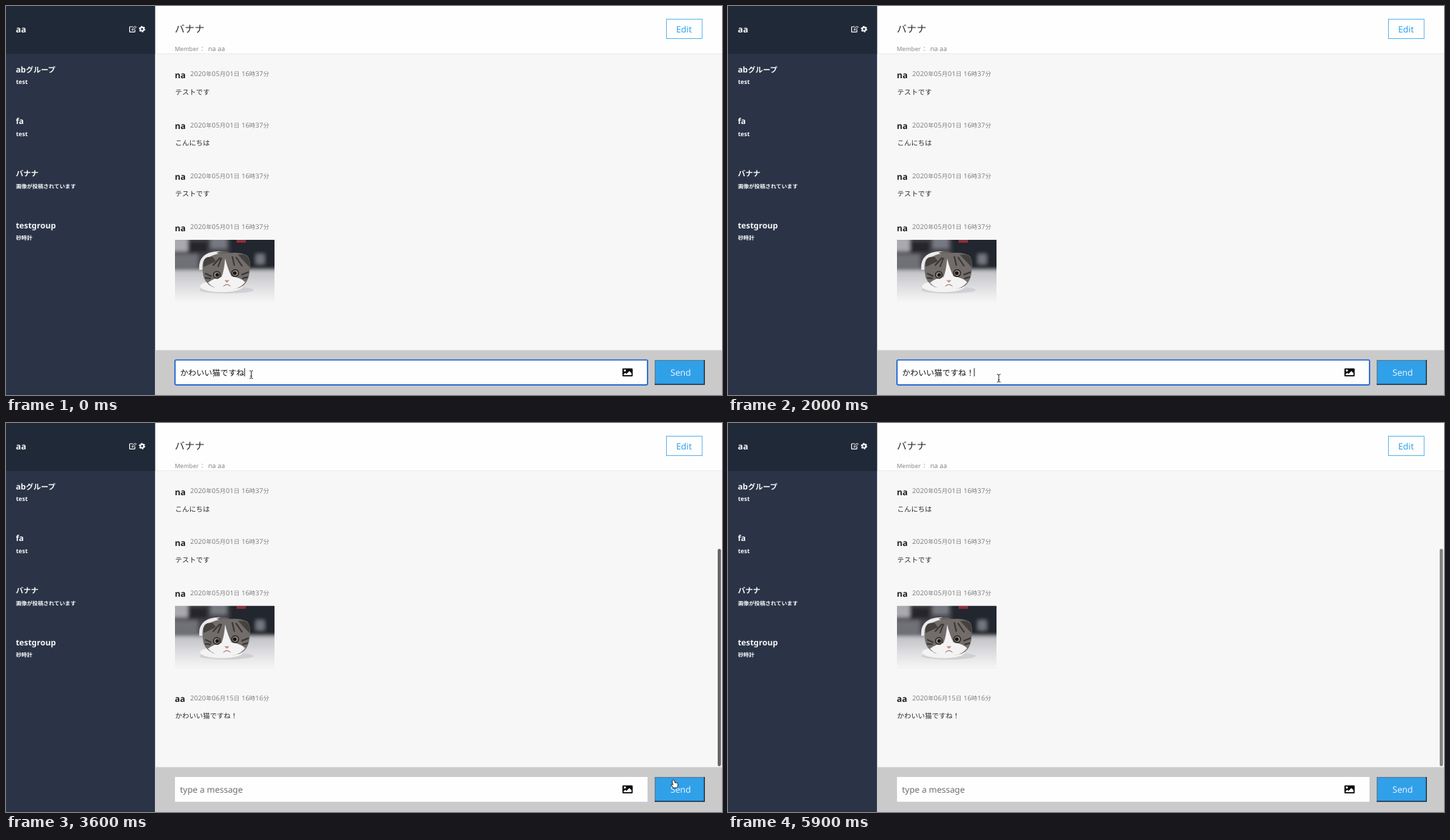
An HTML page for the animation above (6 s loop, 1000 by 544 pixels).

```html
<!DOCTYPE html>
<html lang="ja">
<head>
<meta charset="utf-8">
<title>Group chat</title>
<style>
  html, body { margin: 0; width: 100%; height: 100%; overflow: hidden; background: #f7f7f7; }
  svg { display: block; width: 100vw; height: 100vh; }
  text { white-space: pre; text-rendering: geometricPrecision; }
  .cjk { font-family: "Noto Sans CJK JP", "Noto Sans CJK", sans-serif; }
  .latin { font-family: "Noto Sans", "Open Sans", sans-serif; }
</style>
</head>
<body>
<svg id="stage" viewBox="0 0 1000 544" preserveAspectRatio="none">
  <defs>
    <clipPath id="listClip"><rect x="208" y="67" width="792" height="414"/></clipPath>
    <clipPath id="photoClip"><rect width="139" height="87"/></clipPath>
    <linearGradient id="floor" x1="0" y1="0" x2="0" y2="1">
      <stop offset="0" stop-color="#bfc0c4"/>
      <stop offset=".35" stop-color="#dadadd"/>
      <stop offset=".75" stop-color="#f5f5f5"/>
      <stop offset="1" stop-color="#fafafa"/>
    </linearGradient>
    <linearGradient id="hint" x1="0" y1="0" x2="0" y2="1">
      <stop offset="0" stop-color="#f8f8f8"/>
      <stop offset="1" stop-color="#dedede"/>
    </linearGradient>
    <filter id="soft" x="-20%" y="-20%" width="140%" height="140%"><feGaussianBlur stdDeviation="2.5"/></filter>
    <filter id="fur" x="-20%" y="-20%" width="140%" height="140%"><feGaussianBlur stdDeviation=".7"/></filter>
    <filter id="shade" x="-10%" y="-20%" width="120%" height="160%"><feGaussianBlur stdDeviation="2.5"/></filter>
  </defs>

  <rect width="1000" height="544" fill="#f7f7f7"/>

  <g clip-path="url(#listClip)">
    <g id="list">
      <g transform="translate(236 327)" clip-path="url(#photoClip)">
        <rect width="139" height="87" fill="#d2d2d6"/>
        <g filter="url(#soft)">
          <rect x="-8" y="-8" width="156" height="50" fill="#44454c"/>
          <rect x="-8" y="-8" width="26" height="24" fill="#a9a9af"/>
          <rect x="-8" y="20" width="40" height="20" fill="#6f7077"/>
          <rect x="18" y="2" width="28" height="16" fill="#25262c"/>
          <rect x="50" y="-8" width="22" height="20" fill="#777982"/>
          <rect x="76" y="-8" width="72" height="52" fill="#24262d"/>
          <rect x="113" y="20" width="12" height="14" fill="#747780"/>
          <rect x="-8" y="42" width="160" height="58" fill="url(#floor)"/>
        </g>
        <rect x="86" y="0" width="13" height="4" fill="#8d2f3c" filter="url(#fur)"/>
        <g filter="url(#fur)">
          <path d="M34 42Q32 24 48 18Q64 13 78 20L80 40Z" fill="#ebebed"/>
          <path d="M58 18Q68 13 80 20L76 26Z" fill="#66625f"/>
          <ellipse cx="72" cy="70" rx="38" ry="5" fill="#d0d0d4"/>
          <ellipse cx="65" cy="65" rx="30" ry="8" fill="#f3f3f4"/>
          <path d="M39 47Q36 24 48 24Q59 18 72 19Q88 16 99 21Q107 24 104 46Q102 62 90 67Q72 72 53 66Q40 60 39 47Z" fill="#726d6a"/>
          <path d="M40 38Q38 22 53 24L57 30Z" fill="#45413f"/>
          <path d="M88 21Q107 18 104 38Z" fill="#45413f"/>
          <path d="M53 36l10-11M60 38l5-13M80 23l3 13M85 24l9 13M42 47l9 4M42 53l8 1M93 49l10-4M94 54l8-2" stroke="#393534" stroke-width="2" fill="none"/>
          <path d="M70 26Q74 42 79 51Q92 53 98 59Q90 70 72 70Q55 70 46 60Q55 53 65 52Q69 42 70 26Z" fill="#f4f3f3"/>
          <circle cx="58.5" cy="49" r="5.5" fill="#302b29"/>
          <circle cx="84" cy="46.500" r="5.5" fill="#302b29"/>
          <circle cx="58.5" cy="49" r="3.8" fill="#a0988a"/>
          <circle cx="84" cy="46.500" r="3.8" fill="#a0988a"/>
          <circle cx="59" cy="49" r="2.6" fill="#171516"/>
          <circle cx="83.5" cy="46.500" r="2.6" fill="#171516"/>
          <path d="M69 56.500h7l-3.500 3.500z" fill="#c98780"/>
          <path d="M67.500 65q5-5 10 0" stroke="#8d5f5c" fill="none"/>
        </g>
      </g>
      <g id="reply"></g>
    </g>
  </g>
  <rect id="thumb" x="994" y="176" width="4.6" height="304" rx="2.3" fill="#676767"/>

  <rect x="208" width="792" height="67" fill="#fefefe"/>
  <rect x="208" y="66.4" width="792" height=".8" fill="#e6e6e6"/>
  <rect x="922.400" y="18.400" width="49.800" height="27.200" fill="#fefefe" stroke="#4babeb" stroke-width=".9"/>

  <rect width="208.200" height="544" fill="#2a3446"/>
  <rect width="208.200" height="67" fill="#202937"/>
  <g fill="none" stroke="#f4f5f6" stroke-width="1.2">
    <path d="M177.5 29h-4.200q-.7 0-.7.7v6q0 .7.7.7h6q.7 0 .7-.7v-2.700"/>
    <path d="M176 33.800l.4-1.800 4-4 1.500 1.500-4 4z" stroke-width="1"/>
  </g>
  <g stroke="#f4f5f6" fill="none">
    <circle cx="190" cy="32.300" r="2.500" stroke-width="2"/>
    <circle cx="190" cy="32.300" r="3.800" stroke-width="1.400" stroke-dasharray="1.990"/>
  </g>

  <rect x="208.200" y="481.300" width="792" height="63" fill="#cacaca"/>
  <rect x="236" y="495" width="660" height="34.700" fill="#fefefe"/>
  <rect id="inputRing" x="236" y="495" width="660" height="34.800" rx="1.500" fill="none" stroke="#1c62d2" stroke-width="1.700"/>
  <path fill-rule="evenodd" fill="#0b0b0b" d="M862.300 506.700h11.600q1.400 0 1.400 1.400v8.600q0 1.400-1.400 1.400h-11.600q-1.400 0-1.400-1.400v-8.600q0-1.400 1.400-1.400zM864.300 508.300a1.500 1.500 0 1 0 .01 0zM862.600 516.300h11v-2.700l-3-3-4 4-1.700-1.700-2.300 2.200z"/>

  <rect x="906" y="495" width="70" height="34.700" rx="1" fill="#30a0e9"/>
  <g id="bevel" fill="none" stroke-width="1.300">
    <path d="M906.600 529.700V495.600H976" stroke="#5c7f9a"/>
    <path d="M906 529.100H975.400V495" stroke="#1b2229"/>
  </g>
  <rect id="buttonRing" x="906.200" y="495.200" width="69.600" height="34.400" rx="2.500" fill="none" stroke="#1a55bd" stroke-width="1.600"/>

  <g id="labels"></g>
  <g id="draft"></g>
  <g id="mark"></g>
  <g id="placeholder"></g>
  <path id="underline" d="M333.500 517.600h9.500" stroke="#222"/>
  <rect id="caret" y="506.500" width="1" height="11.500" fill="#222"/>

  <g id="popup">
    <rect x="329" y="475" width="81" height="27" fill="#000" opacity=".35" filter="url(#shade)"/>
    <rect x="329.500" y="473.500" width="80" height="26.500" fill="#fefefe" stroke="#a9a9a9" stroke-width=".8"/>
    <rect x="330" y="487" width="79" height="12.700" fill="url(#hint)"/>
    <rect x="330" y="486" width="79" height="1" fill="#9c7470"/>
  </g>

  <g id="cursor">
    <g id="ibeam" fill="none" stroke="#333">
      <path d="M-2.500-5.500Q0-5.500 0-4Q0-5.500 2.500-5.500M0-4.500V4.500M-2.500 5.500Q0 5.500 0 4Q0 5.500 2.500 5.500M-1.300 2.200h2.600"/>
    </g>
    <path id="arrow" d="M0 0V9L2.100 7.100 3.600 10.400 5.300 9.600 3.800 6.400H6.600Z" fill="#0a0a0a" stroke="#fff" stroke-width=".8"/>
    <path id="hand" d="M-.2.200Q.9-.5 1.700.8L2.700 4 3.800 3.700 4.900 4.100 5.900 4.100 6.500 5V8.300L5.500 11H.2L-2.600 7.200Q-2.800 5.700-1.300 6.200L-.4 7-1.500 1.700Q-1.500.5-.2.200Z" fill="#fff" stroke="#111" stroke-width=".9"/>
  </g>
</svg>

<script>
const NS = 'http://www.w3.org/2000/svg';
const LOOP = 6000, STEP = 100;
const MESSAGE_GAP = 71.2;
const $ = id => document.getElementById(id);

function add(parent, tag, attrs, content = '') {
  const node = document.createElementNS(NS, tag);
  for (const key in attrs) node.setAttribute(key, attrs[key]);
  node.textContent = content;
  parent.appendChild(node);
  return node;
}

// Latin runs are set slightly larger than the Japanese ones beside them.
function write(parent, x, y, content, size, fill, { bold = false, latin = 1.08, spacing = 0 } = {}) {
  const node = add(parent, 'text', { x, y, fill, 'letter-spacing': spacing });
  for (const run of content.match(/[\x20-\x7e]+|[^\x20-\x7e]+/g)) {
    const isLatin = run.charCodeAt(0) < 127;
    add(node, 'tspan', {
      class: isLatin ? 'latin' : 'cjk',
      'font-size': isLatin ? size * latin : size,
      'font-weight': bold ? (isLatin ? 600 : 700) : 400
    }, run);
  }
}

function writeMessage(parent, index, name, date, body, y = 97 + index * MESSAGE_GAP) {
  write(parent, 235.8, y + 3.9, name, 11.1, '#222', { bold: true });
  write(parent, 257.3, y + 1.3, date, 8.33, '#808080', { latin: 1.12, spacing: .13 });
  if (body) write(parent, 236.3, y + 26.7, body, 9.7, '#2c2c32');
}

const labels = $('labels');
write(labels, 13.7, 36.8, 'aa', 11.1, '#f6f7f8', { bold: true });
[['abグループ', 'test'], ['fa', 'test'], ['バナナ', '画像が投稿されています'], ['testgroup', '砂時計']]
  .forEach(([group, last], i) => {
    const y = 92.8 + i * 72.6;
    write(labels, 13.7, y, group, 10.5, '#f6f7f8', { bold: true, latin: 1.08 });
    write(labels, 13.9, y + 16.6, last, 7.64, '#f6f7f8', { bold: true, latin: 1.1 });
  });
write(labels, 235.8, 37.4, 'バナナ', 13.8, '#2a2a2a');
write(labels, 235.8, 63, 'Member', 8.33, '#858585', { latin: 1 });
write(labels, 270, 63, '：', 8.33, '#858585');
write(labels, 282.4, 63, 'na aa', 8.33, '#858585', { latin: 1.1 });
write(labels, 936, 37.1, 'Edit', 11.1, '#30a0e9', { latin: 1.1 });
write(labels, 928, 516.7, 'Send', 11.1, '#e4f3fd', { latin: 1.1 });

const firstDay = '2020年05月01日 16時37分';
['テストです', 'こんにちは', 'テストです', '']
  .forEach((body, i) => writeMessage($('list'), i, 'na', firstDay, body));
writeMessage($('reply'), 4, 'aa', '2020年06月15日 16時16分', 'かわいい猫ですね！', 457.7);

write($('draft'), 243.3, 516.7, 'かわいい猫ですね', 11.2, '#111');
write($('mark'), 332.8, 516.7, '！', 11.1, '#111');
write($('placeholder'), 243, 516.7, 'type a message', 11.1, '#6e6e6e');
write($('popup'), 332.5, 483.3, '！', 8.3, '#111');
write($('popup'), 346.2, 483.1, '[全]', 7.4, '#999');
write($('popup'), 332.8, 497.2, 'Tabキーで選択', 8.75, '#000', { latin: 1.12 });

const TYPED = 1000, POPUP = 1200, CONFIRMED = 1600, PRESSED = 3300, POSTED = 3500;

// Pointer stops: time, x, y
const firstPath = [[0, 342.5, 515.5], [900, 342.5, 515.5]];
const toButton = [[1900, 342.5, 515.5], [2200, 480, 535], [2600, 870, 538],
  [2700, 900.8, 533.3], [3100, 931.8, 499.2], [4000, 931.8, 499.2],
  [4700, 371.3, 415.3], [5500, 371.3, 415.3]];

function along(path, t) {
  const i = path.findIndex(stop => t < stop[0]);
  if (i < 1) return null;
  const [t0, x0, y0] = path[i - 1], [t1, x1, y1] = path[i];
  const u = (t - t0) / (t1 - t0), k = u * u * (3 - 2 * u);
  return [x0 + (x1 - x0) * k, y0 + (y1 - y0) * k];
}

const show = (id, on) => $(id).setAttribute('visibility', on ? 'visible' : 'hidden');

function drawPointer(t) {
  const at = along(firstPath, t) || along(toButton, t);
  const inside = (left, right) => at && at[0] >= left && at[0] <= right && at[1] >= 495 && at[1] <= 530;
  const overInput = inside(236, 896), overButton = inside(906, 976);
  show('ibeam', overInput);
  show('hand', overButton);
  show('arrow', at && !overInput && !overButton);
  if (at) $('cursor').setAttribute('transform', `translate(${at[0]} ${at[1]})`);
}

function caretOn(t) {
  if (t >= PRESSED) return false;
  if (t >= CONFIRMED) return Math.floor((t - CONFIRMED) / 500) % 2 === 0;
  return t >= TYPED || t < 500;
}

function render(time) {
  const t = Math.floor(time % LOOP / STEP) * STEP;
  const posted = t >= POSTED;

  $('list').setAttribute('transform', `translate(0 ${posted ? -MESSAGE_GAP : 0})`);
  show('reply', posted);
  show('thumb', posted);
  $('thumb').setAttribute('opacity', t > 5700 ? 1 - (t - 5700) / 200 * .2 : 1);

  show('draft', !posted);
  show('mark', t >= TYPED && !posted);
  show('placeholder', posted);
  show('underline', t >= TYPED && t < CONFIRMED);
  show('popup', t >= POPUP && t < CONFIRMED);
  show('caret', caretOn(t));
  $('caret').setAttribute('x', t >= TYPED ? 343.5 : 332.7);

  show('inputRing', t < PRESSED);
  show('buttonRing', t >= PRESSED && !posted);
  show('bevel', t < PRESSED || posted);
  drawPointer(t);
}

const start = performance.now();
function tick() {
  render(performance.now() - start);
  requestAnimationFrame(tick);
}
tick();
</script>
</body>
</html>
```
